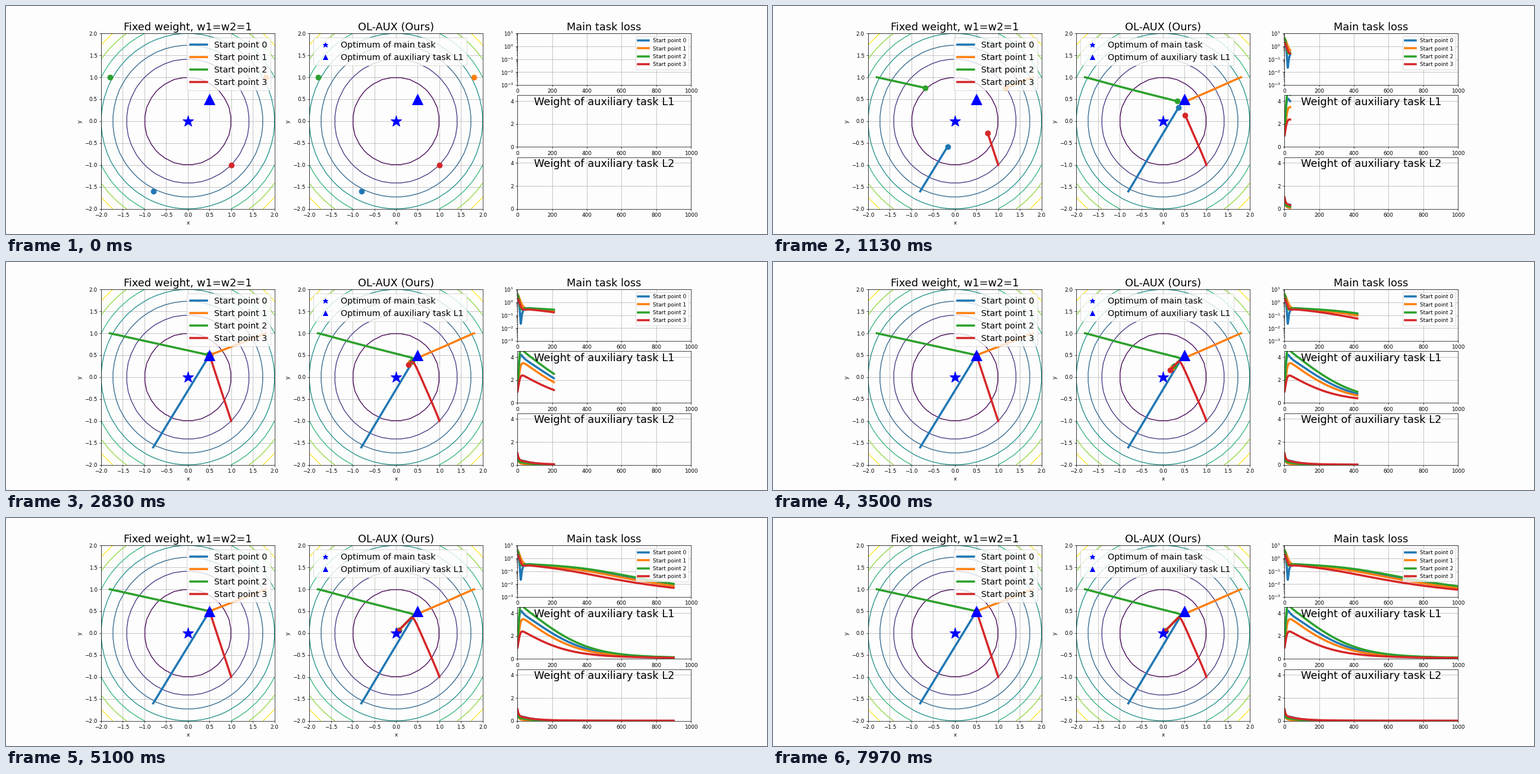
Animation, 1280 px wide and 384 px high, one loop 8000 ms. Source, as a matplotlib script:

```python
import numpy as np
import matplotlib.pyplot as plt
from matplotlib.animation import FuncAnimation
from matplotlib.ticker import LogLocator, NullFormatter

STEPS = 1000
FRAMES, LOOP_MS = 240, 8000
SLOW = 70            # frames that advance one step each
STRIDE = 10          # steps per frame afterwards
LR, WEIGHT_LR = 0.01, 0.01
AUX = np.array([0.5, 0.5])
STARTS = [(-0.8, -1.6), (1.8, 1.0), (-1.8, 1.0), (1.0, -1.0)]
COLORS = ["tab:blue", "tab:orange", "tab:green", "tab:red"]
BG = "#fdfdfd"

plt.rcParams.update({
    "font.family": "DejaVu Sans",
    "figure.facecolor": BG,
    "axes.facecolor": BG,
    "axes.grid": True,
})


def descend(start, adaptive):
    """Gradient descent on main + w1 * L1 + w2 * L2, where L2 = -main."""
    p, logw = np.array(start), np.zeros(2)
    path, weights = [], []
    for _ in range(STEPS + 1):
        w = np.exp(logw)
        path.append(p)
        weights.append(w)
        main = 2 * p
        aux = np.array([2 * (p - AUX), -main])
        if adaptive:
            logw = logw + WEIGHT_LR * aux @ main
        p = p - LR * (main + w @ aux)
    return np.array(path), np.array(weights)


def step_at(frame):
    if frame < SLOW:
        return frame
    return min(SLOW + STRIDE * (frame - SLOW), STEPS)


def plane(pos, title):
    ax = fig.add_subplot(1, 3, pos)
    g = np.linspace(-2, 2, 20)
    x, y = np.meshgrid(g, g)
    ax.contour(x, y, x**2 + y**2, levels=range(1, 8))
    ax.plot(0, 0, "*", color="blue", ms=22, zorder=4)
    ax.plot(*AUX, "^", color="blue", ms=20, zorder=4)
    ax.set(xlim=(-2, 2), ylim=(-2, 2), xlabel="x", ylabel="y")
    ax.set_title(title, fontsize=20, y=1.0)
    return ax


def chart(row, title, title_y, ylim):
    ax = fig.add_subplot(3, 3, 3 * row)
    ax.set(xlim=(0, STEPS), ylim=ylim)
    ax.set_title(title, fontsize=20, y=title_y)
    return ax


fig = plt.figure(figsize=(20, 6), dpi=64)
fixed_ax = plane(1, "Fixed weight, w1=w2=1")
ours_ax = plane(2, "OL-AUX (Ours)")
loss_ax = chart(1, "Main task loss", 1.0, (1e-3, 10))
w1_ax = chart(2, "Weight of auxiliary task L1", 0.75, (0, 4.5))
w2_ax = chart(3, "Weight of auxiliary task L2", 0.75, (0, 4.5))

loss_ax.set_yscale("log")
loss_ax.set_ylim(1e-3, 10)
loss_ax.yaxis.set_major_locator(LogLocator(numticks=9))
loss_ax.yaxis.set_minor_locator(LogLocator(subs=range(2, 10), numticks=9))
loss_ax.yaxis.set_minor_formatter(NullFormatter())

curves, dots = [], []


def add_curve(ax, xy, color, label):
    line, = ax.plot([], [], color=color, lw=4, label=label)
    curves.append((line, xy))


def add_path(ax, xy, color, label):
    add_curve(ax, xy, color, label)
    dot, = ax.plot([], [], "o", color=color, ms=10)
    dots.append((dot, xy))


steps = np.arange(STEPS + 1)
for i, (start, color) in enumerate(zip(STARTS, COLORS)):
    label = f"Start point {i}"
    add_path(fixed_ax, descend(start, False)[0], color, label)
    path, weights = descend(start, True)
    add_path(ours_ax, path, color, None)
    series = (path**2).sum(axis=1), weights[:, 0], weights[:, 1]
    for ax, values in zip((loss_ax, w1_ax, w2_ax), series):
        add_curve(ax, np.column_stack([steps, values]), color, label)

for marker, name in (("*", "main task"), ("^", "auxiliary task L1")):
    ours_ax.plot([], [], marker, color="blue", ms=10,
                 label=f"Optimum of {name}")

fixed_ax.legend(loc="upper right", fontsize=16)
ours_ax.legend(loc="upper left", fontsize=16)
loss_ax.legend(loc="upper right", fontsize=10)


def update(frame):
    t = step_at(frame)
    for line, xy in curves:
        line.set_data(xy[:t + 1].T)
    for dot, xy in dots:
        dot.set_data(xy[t:t + 1].T)
    return [artist for artist, _ in curves + dots]


anim = FuncAnimation(fig, update, frames=FRAMES, interval=LOOP_MS / FRAMES,
                     repeat=True, repeat_delay=0)
plt.show()
```
